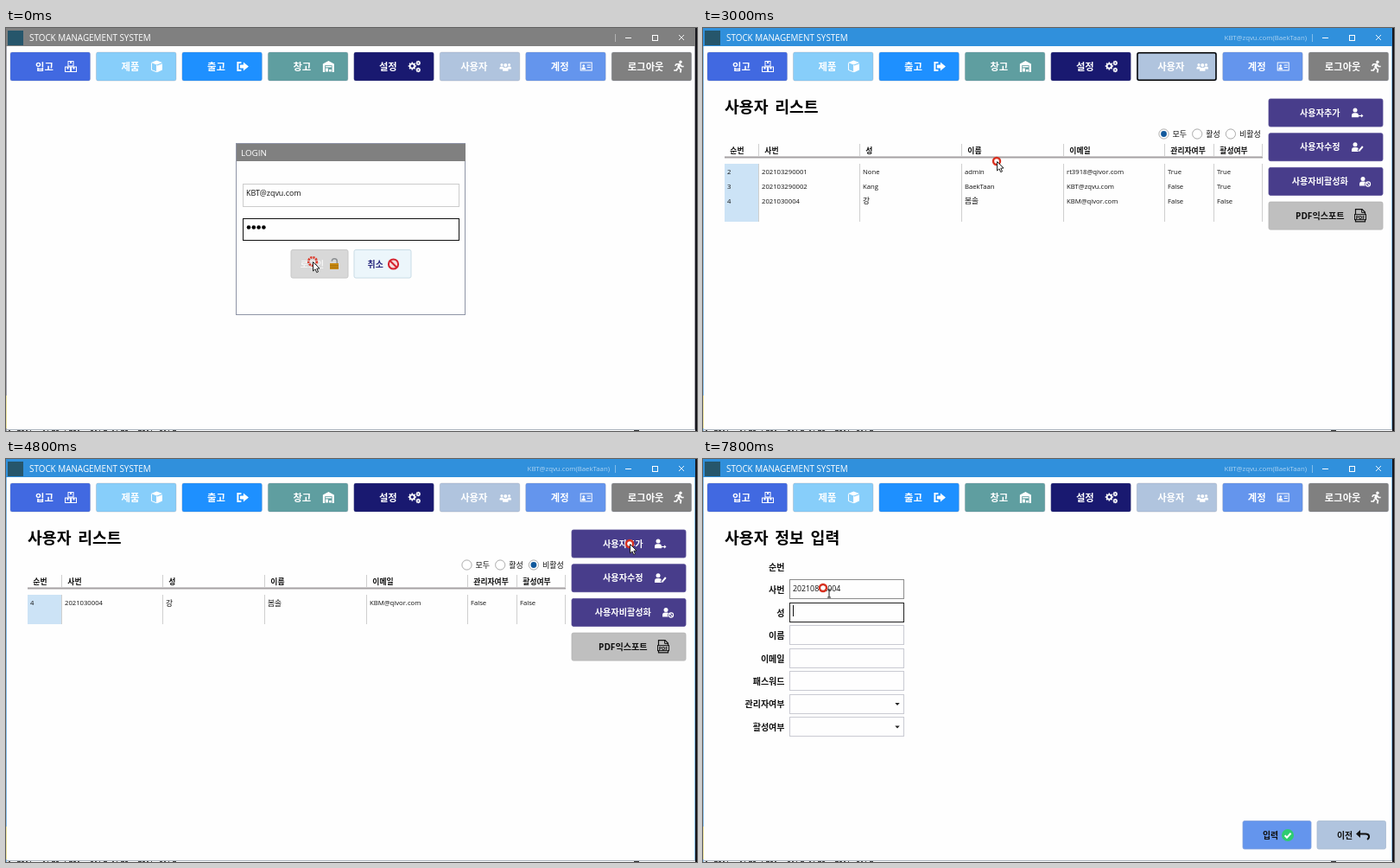
Animation of 800x466 px, one loop 8000 ms. Source, as an HTML page with a canvas:

```html
<!DOCTYPE html>
<html lang="ko">
<head>
<meta charset="utf-8">
<title>Stock management</title>
<style>
html, body { margin: 0; width: 100%; height: 100%; overflow: hidden; background: #fefefe; }
canvas { display: block; }
</style>
</head>
<body>
<canvas id="stage" width="800" height="466"></canvas>
<script>
const ctx = document.getElementById('stage').getContext('2d');
const FONT = "'Open Sans', 'Noto Sans CJK KR', 'Noto Sans CJK', sans-serif";
const LOOP = 8000, STEP = 200;
const PAPER = '#fefefe';
const USER = 'KBT@zqvu.com';

// ---------- helpers ----------
function rect(x, y, w, h, fill) {
  ctx.fillStyle = fill;
  ctx.fillRect(x, y, w, h);
}
function frame(x, y, w, h, color, width = 1) {
  ctx.strokeStyle = color;
  ctx.lineWidth = width;
  ctx.strokeRect(x + .5, y + .5, w - 1, h - 1);
}
function rounded(x, y, w, h, fill, stroke, width = 1) {
  ctx.beginPath();
  ctx.roundRect(x, y, w, h, 2);
  ctx.fillStyle = fill;
  ctx.fill();
  if (stroke) { ctx.strokeStyle = stroke; ctx.lineWidth = width; ctx.stroke(); }
}
function text(s, x, y, size, color = '#111', { bold = false, align = 'left' } = {}) {
  ctx.font = `${bold ? 700 : 400} ${size}px ${FONT}`;
  ctx.fillStyle = color;
  ctx.textAlign = align;
  ctx.fillText(s, x, y + size * .37);
}
function bold(s, x, y, size, color, align = 'center') {
  text(s, x, y, size, color, { bold: true, align });
}
function trace(points, close) {
  ctx.beginPath();
  points.forEach(([x, y], i) => i ? ctx.lineTo(x, y) : ctx.moveTo(x, y));
  if (close) ctx.closePath();
}
function line(points, color, width = 1) {
  trace(points);
  ctx.strokeStyle = color;
  ctx.lineWidth = width;
  ctx.stroke();
}
function poly(points, fill) {
  trace(points, true);
  ctx.fillStyle = fill;
  ctx.fill();
}
function disc(x, y, r, fill) {
  ctx.beginPath();
  ctx.arc(x, y, r, 0, 7);
  ctx.fillStyle = fill;
  ctx.fill();
}
function ring(x, y, r, color, width = 1) {
  ctx.beginPath();
  ctx.arc(x, y, r, 0, 7);
  ctx.strokeStyle = color;
  ctx.lineWidth = width;
  ctx.stroke();
}
function at(x, y, draw) {
  ctx.save();
  ctx.translate(x, y);
  draw();
  ctx.restore();
}

// ---------- icons, each centred on 0,0 ----------
const W = '#fff';
function person(x, y, k, color = W) {
  disc(x, y - 2.5 * k, 2.5 * k, color);
  ctx.beginPath();
  ctx.roundRect(x - 4 * k, y + .7 * k, 8 * k, 5 * k, [3 * k, 3 * k, 0, 0]);
  ctx.fill();
}
function gear(x, y, r, hole) {
  for (let i = 0; i < 8; i++) {
    const a = i * Math.PI / 4, c = Math.cos(a), s = Math.sin(a);
    line([[x, y], [x + c * (r + 1), y + s * (r + 1)]], W, 1.5);
  }
  disc(x, y, r, W);
  disc(x, y, r * .48, hole);
}
const icons = {
  boxes() {
    for (const [x, y] of [[-3, -6], [-6.5, .5], [.5, .5]]) {
      ctx.strokeStyle = W;
      ctx.lineWidth = 1;
      ctx.strokeRect(x, y, 6, 5.5);
      rect(x + 2, y, 2, 2.5, W);
    }
  },
  cube() {
    poly([[0, -7], [6.5, -4.5], [0, -2], [-6.5, -4.5]], W);
    poly([[.6, -1], [6.5, -3.3], [6.5, 4], [.6, 6.7]], W);
    line([[-6, -4], [-6, 4], [0, 6.3], [0, -1.5]], W, 1);
  },
  exit() {
    line([[-1.5, -4.5], [-5.5, -4.5], [-5.5, 4.5], [-1.5, 4.5]], W, 2);
    poly([[-3, -2], [1, -2], [1, -5], [7, 0], [1, 5], [1, 2], [-3, 2]], W);
  },
  depot(bg) {
    poly([[-6.5, -3], [0, -6.5], [6.5, -3], [6.5, 6.5], [-6.5, 6.5]], W);
    rect(-4.2, -1.3, 8.4, 7.8, bg);
    rect(-3.4, -.5, 6.8, 1.4, W);
    rect(-3.4, 2, 3, 4, W);
    rect(.6, 3.4, 2.8, 2.6, W);
  },
  gears(bg) {
    gear(-2.5, -.5, 3.6, bg);
    gear(4.5, -4, 1.7, bg);
    gear(4.5, 4, 1.7, bg);
  },
  users() {
    person(-4.3, -.5, .6);
    person(4.3, -.5, .6);
    person(0, .6, .8);
  },
  card() {
    frame(-7, -5, 14, 10, W, 1);
    person(-3, .4, .55);
    line([[1, -1.5], [5, -1.5]], W, 1);
    line([[1, 1], [5, 1]], W, 1);
  },
  runner() {
    disc(1.8, -5.3, 1.7, W);
    ctx.lineJoin = 'round';
    line([[-4.5, -.8], [-3, -2.7], [1, -2.7], [3, 0], [5.5, 0]], W, 1.5);
    line([[.6, -2.5], [-.8, 1.4]], W, 3);
    line([[-.8, 1.4], [2.3, 3.4], [1.6, 7]], W, 1.7);
    line([[-1.5, 2], [-3, 4.5], [-6, 4.5]], W, 1.7);
  },
  addUser() {
    person(-2, 0, 1);
    line([[2, 4], [6.5, 4]], W, 1.2);
    poly([[5, 2], [7.5, 4], [5, 6]], W);
  },
  editUser() {
    person(-2, 0, 1);
    line([[2, 5.5], [7, -.5]], '#483d8b', 4);
    line([[2.3, 5.2], [6.8, -.2]], W, 2);
  },
  banUser() {
    person(-2, 0, 1);
    disc(4, 3.6, 3.8, '#483d8b');
    ring(4, 3.6, 2.6, W, 1.1);
    line([[2.2, 1.8], [5.8, 5.4]], W, 1.1);
  },
  paper() {
    line([[-5.5, -1], [-5.5, -7], [2, -7], [5.5, -3.5], [5.5, -1]], '#111', 1.2);
    line([[1.6, -7], [1.6, -3.2], [5.5, -3.2]], '#111', 1);
    line([[-5.5, 5], [-5.5, 7.3], [5.5, 7.3], [5.5, 5]], '#111', 1.2);
    frame(-7, -1.5, 14, 7, '#111', 1);
    bold('PDF', 0, 2.1, 5.5, '#111');
  },
  lock() {
    ctx.beginPath();
    ctx.arc(.3, -2.8, 3, Math.PI, Math.PI * 2);
    ctx.lineTo(3.3, 0);
    ctx.strokeStyle = '#8c8f92';
    ctx.lineWidth = 1.5;
    ctx.stroke();
    rect(-5, -.5, 10, 7, '#c98a12');
    rect(-5, 1.7, 10, 1, '#a87008');
    rect(-5, 4, 10, 1, '#a87008');
  },
  ban() {
    disc(0, 0, 5.5, '#f6dcdc');
    ring(0, 0, 5.6, '#d5232f', 2);
    line([[-4, -4], [4, 4]], '#d5232f', 2);
  },
  check() {
    disc(0, 0, 7, '#2ecc71');
    line([[-3.4, .2], [-1, 2.7], [3.6, -2.3]], W, 2);
  },
  back() {
    poly([[-8, -1.5], [-3, -6], [-3, 3]], '#111');
    ctx.beginPath();
    ctx.moveTo(-4, -1.5);
    ctx.lineTo(3, -1.5);
    ctx.bezierCurveTo(8, -1.5, 8, 3, 5, 5);
    ctx.strokeStyle = '#111';
    ctx.lineWidth = 2;
    ctx.stroke();
  }
};

// ---------- window ----------
const NAV = [
  ['입고', '#4169e1', 'boxes', 70], ['제품', '#87cefa', 'cube', 70],
  ['출고', '#1e90ff', 'exit', 70], ['창고', '#5f9ea0', 'depot', 70],
  ['설정', '#191970', 'gears', 70], ['사용자', '#b0c4de', 'users', 76],
  ['계정', '#6495ed', 'card', 70], ['로그아웃', '#808080', 'runner', 78]
];

function drawWindow(t) {
  const active = t >= 1800 && !(t >= 5400 && t < 6600);
  const bar = active ? '#3090dc' : '#808080';
  rect(0, 0, 800, 466, PAPER);
  rect(0, 0, 798, 21, bar);
  rect(0, 21, 1, 445, active ? '#8bbfe8' : '#a5a5ad');
  rect(0, 425, 1, 38, '#eadf9b');
  rect(797, 21, 1, 444, active ? '#8bbfe8' : '#a0a0a8');
  rect(798, 0, 2, 466, '#16161c');
  rect(1, 464, 797, 1, '#a9b2bb');
  for (let x = 3; x < 208; x += 5) {
    if (x * 7 % 11 > 2) rect(x, 465, 1 + x * 3 % 4, 1, '#444');
  }
  rect(727, 465, 6, 1, '#333');

  rect(2, 3, 18, 17, '#26566b');
  text('STOCK MANAGEMENT SYSTEM', 27, 11.5, 9.9, W);
  if (t >= 1800) {
    text(USER + '(BaekTaan)', 699, 11.5, 7.8, 'rgba(255,255,255,.6)', { align: 'right' });
  }
  rect(705, 7, 1, 9, 'rgba(255,255,255,.4)');
  rect(717, 11, 7, 1, W);
  frame(748, 8, 7, 7, W);
  line([[779, 8], [785, 14]], W, .9);
  line([[785, 8], [779, 14]], W, .9);

  const focused = t >= 2600 && t < 3400 ? 5 : -1;
  NAV.forEach(([label, color, icon, dx], i) => {
    const x = 5 + i * 99.45;
    rounded(x, 28, 92.5, 33, color, 'rgba(120,130,150,.35)', .7);
    if (i === focused) rounded(x + .7, 28.7, 91, 31.6, color, '#000', 1.5);
    bold(label, x + 39.5, 45, 11.3, W);
    at(x + dx, 44.5, () => icons[icon](color));
  });
}

function heading(s) {
  ctx.wordSpacing = '3px';
  bold(s, 25, 91.5, 18.3, '#000', 'left');
  ctx.wordSpacing = '0px';
}

// ---------- login ----------
function drawLogin(t) {
  const edge = '#8f94a6', clicked = t >= 400;
  rect(267, 134, 265, 198, PAPER);
  frame(266, 133, 266, 199, edge);
  rect(267, 134, 265, 20, '#808080');
  text('LOGIN', 272, 144.5, 9.8, W);
  frame(274, 180, 251, 27, '#ccc');
  text(USER, 278, 191, 8.9);
  frame(274, 220, 251, 26, clicked ? '#ccc' : '#111');
  for (let i = 0; i < 4; i++) disc(281 + i * 5.8, 230.5, 2.3, '#000');
  rounded(330, 256.5, 66, 32.5, '#d8d8d8', '#c8c8c8');
  bold('로그인', 354.5, 273, 9.9, '#f4f4f4');
  at(380, 272.5, icons.lock);
  rounded(403, 256.5, 66, 32.5, '#ecf6fb', '#c9dce6');
  bold('취소', 427.7, 273, 9.9, '#24247c');
  at(448.5, 273, icons.ban);
}

// ---------- user list ----------
const COLS = [25, 64, 181, 299, 417, 534, 591, 647];
const HEADS = ['순번', '사번', '성', '이름', '이메일', '관리자여부', '활성여부'];
const ROWS = [
  ['2', '202103290001', 'None', 'admin', 'rt3918@qivor.com', 'True', 'True'],
  ['3', '202103290002', 'Kang', 'BaekTaan', USER, 'False', 'True'],
  ['4', '2021030004', '강', '봄솔', 'KBS'.replace('S', 'M') + '@qivor.com', 'False', 'False']
];
const ACTIONS = [['사용자추가', 'addUser', 757], ['사용자수정', 'editUser', 757],
  ['사용자비활성화', 'banUser', 766], ['PDF익스포트', 'paper', 761]];

function drawList(t) {
  const filtered = t >= 4400;
  const rows = filtered ? ROWS.slice(2) : ROWS;
  const picked = t >= 3400 && !filtered ? 1 : -1;
  const bottom = 224 - (filtered ? 33 : 0);
  heading('사용자 리스트');

  ['모두', '활성', '비활성'].forEach((label, i) => {
    const x = 533.5 + i * 38.7, hover = i === 2 && t >= 4000 && t < 4600;
    disc(x, 122.5, 5.8, '#fff');
    ring(x, 122.5, 5.6, hover ? '#8cc8ee' : '#a9a9a9', hover ? 2.5 : 1);
    if (i === (t >= 4200 ? 2 : 0)) disc(x, 122.5, 3.4, '#12599c');
    text(label, x + 10, 122.5, 9);
  });

  HEADS.forEach((h, i) => {
    bold(h, COLS[i] + (i ? 7.3 : 6.3), 141.5, 8.8, '#111', 'left');
    rect(COLS[i + 1], 134, 1, 14, '#cfcfcf');
  });
  rect(25, 148.5, 623, 2, '#a5a1a3');

  rect(25, 157, 39, bottom - 157, '#cce3f6');
  if (picked >= 0) {
    const y = 158 + picked * 16.5;
    rect(25, y, 39, 16.5, '#3b92da');
    rect(64, y, 583, 16.5, '#92c6ed');
  }
  for (const x of COLS.slice(1)) rect(x, 157, 1, bottom - 157, '#cfcfcf');
  rows.forEach((row, r) => row.forEach((s, i) => {
    text(s, COLS[i] + (i ? 4 : 3), 166.5 + r * 16.6, s > '가' ? 8.7 : 7.7);
  }));

  ACTIONS.forEach(([label, icon, x], i) => {
    const y = 82 + i * 39.7, last = i === 3;
    rounded(655, y, 132, 32, last ? '#bfbfbf' : '#483d8b', last ? '#b3b3b3' : '#544a94', .8);
    bold(label, 714.3, y + 16, 10.1, last ? '#111' : W);
    at(x, y + 15.5, icons[icon]);
  });
}

// ---------- new user form ----------
const LABELS = ['순번', '사번', '성', '이름', '이메일', '패스워드', '관리자여부', '활성여부'];
const NUMBER = '20210802004';

function drawForm(t) {
  const typed = NUMBER.slice(0, Math.max(0, Math.round((t - 6800) / 600 * NUMBER.length)));
  const focus = t < 6800 ? 0 : t < 7600 ? 1 : 2;
  heading('사용자 정보 입력');
  LABELS.forEach((label, i) => {
    const y = 125 + i * 26.45;
    bold(label, 94.5, y, 10, '#111', 'right');
    if (!i) return;
    const hover = i === 1 && t >= 6800;
    frame(100, Math.round(y - 12), 133, 23, focus === i ? '#222' : hover ? '#8c8c8c' : '#c9cad2');
    if (i > 5) poly([[222.3, y - 1.6], [227.7, y - 1.6], [225, y + 1.3]], '#222');
  });
  if (typed) text(typed, 104, 149.7, 8.8);
  if (focus === 1) {
    ctx.font = `400 8.8px ${FONT}`;
    rect(Math.round(105 + ctx.measureText(typed).width), 143, 1, 13, '#111');
  }
  if (focus === 2) rect(104, 169, 1, 13, '#111');

  rounded(625, 418.5, 79, 32.5, '#6495ed', '#7f9fdc', .8);
  bold('입력', 657, 435, 9.9, '#111');
  at(677, 435, icons.check);
  rounded(711, 418.5, 79.5, 32.5, '#b0c4de', '#a9bbd2', .8);
  bold('이전', 743, 435, 9.9, '#111');
  at(764, 435, icons.back);
}

// ---------- pointer ----------
const PATH = [
  [0, 355, 270], [1800, 355, 270], [2400, 546, 47], [2600, 546, 47], [3000, 340, 154],
  [3400, 362, 183], [4000, 610, 122], [4400, 610, 122], [4800, 722, 98], [5000, 722, 98],
  [5200, 830, 130], [6400, 830, 250], [6800, 139, 149], [8000, 139, 149]
];
const CLICKS = [[0, 2000], [2400, 2800], [3000, 3200], [3400, 3600], [4200, 4400],
  [4800, 5000], [6800, 8000]];

function pointerAt(t) {
  const i = PATH.findIndex(p => p[0] > t);
  const [t0, x0, y0] = PATH[i - 1], [t1, x1, y1] = PATH[i];
  const u = (t - t0) / (t1 - t0), e = u * u * (3 - 2 * u);
  return [x0 + (x1 - x0) * e, y0 + (y1 - y0) * e];
}

function drawPointer(t) {
  const [x, y] = pointerAt(t);
  if (CLICKS.some(([a, b]) => t >= a && t < b)) {
    if (t < 200) {
      ctx.setLineDash([2.2, 1]);
      ring(x, y, 4.8, '#dc3b2c', 2.6);
      ctx.setLineDash([]);
    } else {
      disc(x, y, 3, '#fff');
      ring(x, y, 4, '#d8301f', 2.4);
    }
  }
  if (t >= 6800) {
    line([[x + 5, y + 2], [x + 9, y + 2]], '#222', 1);
    line([[x + 7, y + 2], [x + 7, y + 11]], '#222', 1);
    line([[x + 5, y + 11], [x + 9, y + 11]], '#222', 1);
    return;
  }
  at(x, y, () => {
    poly([[.5, .5], [.5, 11], [3, 8.8], [4.7, 12.6], [6.5, 11.8], [4.8, 8.2], [8, 8]], '#fff');
    ctx.strokeStyle = '#222';
    ctx.lineWidth = 1;
    ctx.stroke();
  });
}

// ---------- loop ----------
function draw(t) {
  drawWindow(t);
  if (t < 1800) drawLogin(t);
  else if (t < 2000) rect(272, 142, 254, 16, 'rgba(90,110,160,.02)');
  else if (t >= 2600 && t < 5000) drawList(t);
  else if (t >= 5000) drawForm(t);
  drawPointer(t);
}
function tick(now) {
  draw(Math.floor(now % LOOP / STEP) * STEP);
  requestAnimationFrame(tick);
}
draw(0);
requestAnimationFrame(tick);
</script>
</body>
</html>
```
